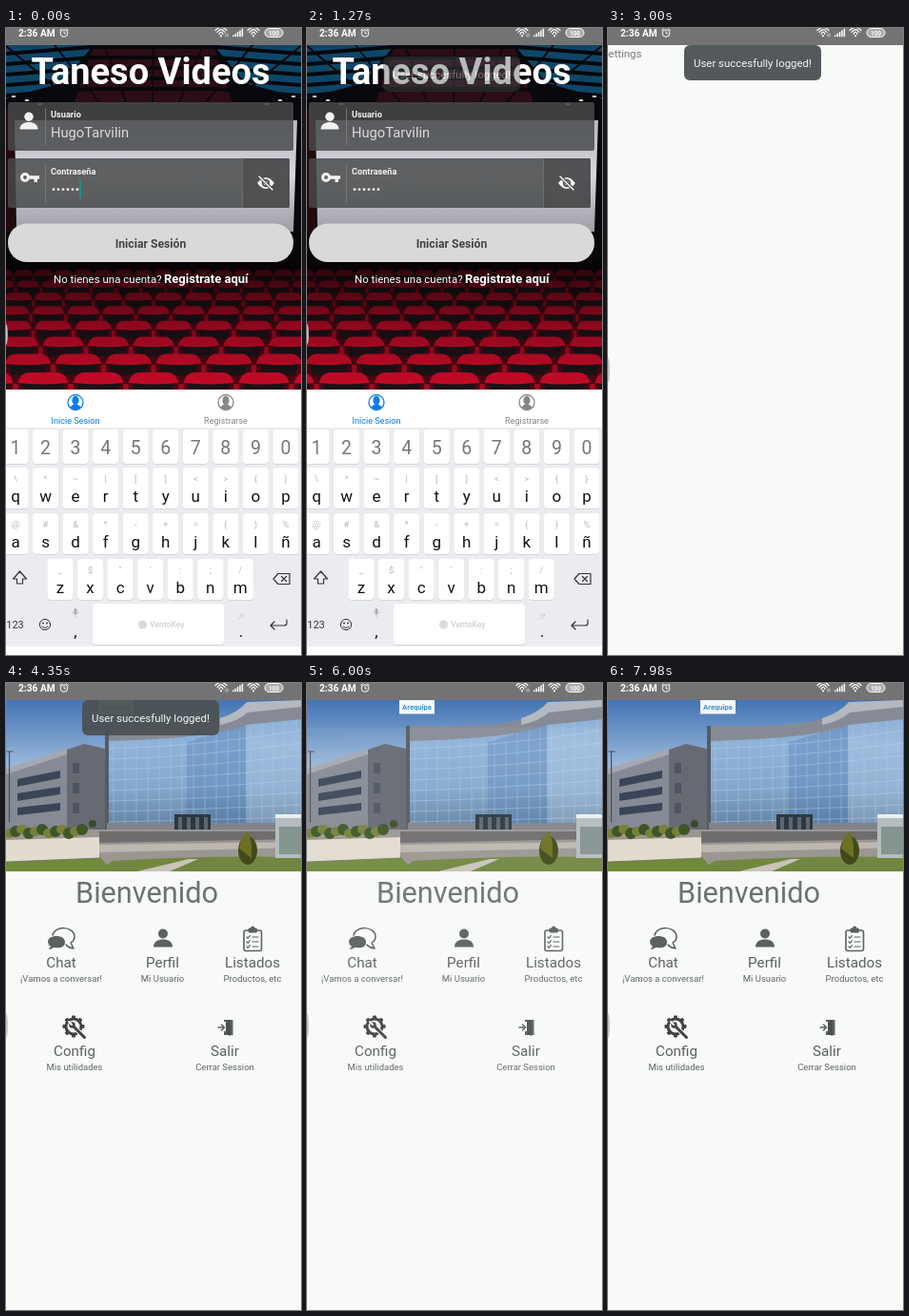
Recreate the animation shown at these times as an HTML page. Size 310 px wide and 659 px high, loop 8000 ms.

```html
<!DOCTYPE html>
<html lang="es">
<head>
<meta charset="utf-8">
<title>App</title>
<style>
html, body { margin: 0; width: 100%; height: 100%; overflow: hidden; background: #f7faf7; }
svg { display: block; width: 100%; height: 100%; }
text { font-family: Roboto, "Noto Sans", sans-serif; white-space: pre; }
</style>
</head>
<body>
<svg id="stage" viewBox="0 0 310 659"></svg>
<script>
const LOOP = 8000, PAGE = '#f7faf7';

const rect = (x, y, w, h, fill, r = 0, more = '') =>
  `<rect x="${x}" y="${y}" width="${w}" height="${h}" rx="${r}" fill="${fill}" ${more}/>`;
const path = (d, fill, more = '') => `<path d="${d}" fill="${fill}" ${more}/>`;
const line = (d, color, w = 1, more = '') =>
  path(d, 'none', `stroke="${color}" stroke-width="${w}" stroke-linecap="round" stroke-linejoin="round" ${more}`);
const disc = (x, y, r, fill, more = '') => `<circle cx="${x}" cy="${y}" r="${r}" fill="${fill}" ${more}/>`;
const oval = (x, y, rx, ry, fill) => `<ellipse cx="${x}" cy="${y}" rx="${rx}" ry="${ry}" fill="${fill}"/>`;
const text = (s, x, y, size, fill, anchor = 'middle', weight = 400) =>
  `<text x="${x}" y="${y}" font-size="${size}" fill="${fill}" text-anchor="${anchor}" font-weight="${weight}">${s}</text>`;
const group = (id, body, more = '') => `<g id="${id}" ${more}>${body}</g>`;
const repeat = (n, f) => Array.from({ length: n }, (_, i) => f(i)).join('');
const gradient = (id, ...stops) => `<linearGradient id="${id}" x2="0" y2="1">` +
  stops.map((c, i) => `<stop offset="${i / (stops.length - 1)}" stop-color="${c}"/>`).join('') + '</linearGradient>';

function wifi(x) {
  const arc = r => line(`M${x - r} ${8.5 - r} Q${x} ${4.5 - r * 1.4} ${x + r} ${8.5 - r}`, '#fff', 1.2);
  return arc(2) + arc(4) + arc(6) + disc(x, 8.3, 1.1, '#fff');
}

function statusBar() {
  return rect(0, 0, 310, 18, '#737373') +
    text('2:36 AM', 13, 9, 10.2, '#fff', 'start', 700) +
    disc(61, 5.5, 3.8, 'none', 'stroke="#fff"') + line('M61 3.5V5.8H62.8M56.5 2.5L58.5 .8M65.5 2.5L63.5 .8', '#fff', .9) +
    wifi(226) + line('M231 6v3m2-3v3', '#ddd', .8) +
    repeat(5, i => rect(238 + i * 2.4, 7.5 - i * 1.7, 1.5, 1.7 + i * 1.7, '#fff')) + wifi(260) +
    rect(272, .5, 19, 9, '#aaa', 4.5, 'stroke="#fff"') + text('100', 281.5, 7.6, 6.5, '#fff', 'middle', 700);
}

// A row of seats: red cushion tops above dark backs with red sides.
function seatRow(y, w, h, shift) {
  const half = Math.ceil(155 / w) + 1;
  return rect(0, y + h * .3, 310, h, '#4a0713') + repeat(half * 2 + 1, i => {
    const x = 155 + (i - half + shift) * w;
    return path(`M${x + w * .1} ${y + h * .4}H${x + w * .9}L${x + w * .82} ${y + h}H${x + w * .18}Z`, '#1c1216') +
      path(`M${x + w * .04} ${y + h * .46}Q${x + w * .1} ${y} ${x + w * .24} ${y}H${x + w * .76}Q${x + w * .9} ${y} ${x + w * .96} ${y + h * .46}Q${x + w / 2} ${y + h * .58} ${x + w * .04} ${y + h * .46}Z`, '#c80a28') +
      rect(x - w * .05, y + h * .5, w * .1, h * .42, '#a30a20', 1);
  });
}

function cinema() {
  const seats = repeat(8, i => {
    const u = i / 7;
    return seatRow(254 + 75 * u + 33 * u * u, 21 + 37 * u, 13 + 11 * u, i % 2 / 2);
  });
  return rect(0, 18, 310, 362, '#09080c') +
    path('M0 18H92L58 58L0 74Z', '#0e4668') + path('M310 18H218L252 58L310 74Z', '#0e4668') +
    path('M92 18H218L238 78H72Z', '#2c0d17') +
    repeat(5, i => line(`M0 ${27 + i * 11}L90 ${20 + i * 11}H220L310 ${27 + i * 11}`, '#07080c', 4)) +
    repeat(7, i => line(`M${i * 52 - 1} 18L${70 + i * 28} 78`, '#0d080c', 2)) +
    repeat(3, i => oval(8 + i * 14, 72 + i * 4, 2.5, 1, '#e8dccf') + oval(302 - i * 14, 72 + i * 4, 2.5, 1, '#e8dccf')) +
    path('M0 84L9 92V216H0Z', '#24090f') +
    path('M9 97H306L302 214H11Z', 'url(#screen)') +
    path('M0 214H310V256H0Z', '#0a0709') + seats +
    rect(0, 246, 310, 134, 'url(#shade)');
}

const person = (x, y, s, fill) =>
  `<g transform="translate(${x} ${y}) scale(${s})">` + disc(0, -5, 5, fill) +
  path('M-10 9C-10 3 -5 1 0 1S10 3 10 9Z', fill) + '</g>';

function tab(x, label, color) {
  return disc(x, 393.5, 8, '#fff', `stroke="${color}" stroke-width="1.3"`) +
    oval(x, 391.5, 3.6, 4.7, color) + path(`M${x - 6} 399Q${x - 4} 396 ${x - 1.8} 395.5H${x + 1.8}Q${x + 4} 396 ${x + 6} 399Q${x} 403.5 ${x - 6} 399Z`, color) +
    text(label, x, 416, 9.1, color);
}

function login() {
  const box = '#484a4c', glass = 'fill-opacity=".84"';
  return cinema() + text('Taneso Videos', 152, 59, 38, '#fff', 'middle', 700) +
    rect(2, 78, 300, 51, box, 2, glass) + rect(2, 137, 296, 52, box, 2, glass) +
    rect(248.5, 137, 49.5, 52, '#333', 0, 'fill-opacity=".3"') + line('M248.5 137V189', '#777', .7) +
    line('M41.5 85V123M41.5 143V183', '#777') +
    person(24, 98, .95, '#f2f2f2') +
    text('Usuario', 47, 94, 9.2, '#f4f4f4', 'start', 700) + text('HugoTarvilin', 47, 115, 14.7, '#dadada', 'start') +
    disc(20, 157, 3.5, 'none', 'stroke="#f2f2f2" stroke-width="3"') + path('M24 155.3H35V158.8H33V162H29.5V158.8H24Z', '#f2f2f2') +
    text('Contraseña', 47, 154, 9.2, '#f4f4f4', 'start', 700) +
    repeat(6, i => disc(50 + i * 5, 169.7, 1.4, '#eee')) +
    rect(77.3, 159.5, 1.5, 20, '#12a08d', 0, 'id="caret"') +
    path('M264 163Q273 151 282 163Q273 175 264 163Z', '#f2f2f2') + disc(273, 163, 4.2, '#505152') + disc(273, 163, 2.4, '#f2f2f2') +
    line('M265.5 155L281 171', '#505152', 3.6) + line('M266 156L280 170', '#f2f2f2', 1.5) +
    group('button', rect(2, 205.5, 300, 40.5, '#d8dad9', 20) + text('Iniciar Sesión', 152, 231, 12.2, '#444', 'middle', 700)) +
    text('No tienes una cuenta?', 50, 268, 11.5, '#fff', 'start') + text('Registrate aquí', 166, 268, 13, '#fff', 'start', 700) +
    oval(0, 322, 1.8, 11, '#c9c4c6') +
    rect(0, 380, 310, 40, '#fff') + tab(73, 'Inicie Sesion', '#0b7bea') + tab(231, 'Registrarse', '#868686');
}

function keyRow(letters, marks, x0, y, h) {
  return [...letters].map((c, i) => {
    const x = x0 + i * 31.55;
    const mark = { '<': '&lt;', '>': '&gt;', '&': '&amp;' }[marks[i]] || marks[i];
    return rect(x - 13.5, y + 1, 27, h, '#d3d6da', 4) + rect(x - 13.5, y, 27, h, '#fff', 4) +
      (marks ? text(mark, x, y + 15, 9.5, '#b4b6b9') + text(c, x, y + 36, 17, '#111')
             : text(c, x, y + 25.5, 19.5, '#74777a'));
  }).join('');
}

function keyboard() {
  const ink = '#333';
  return rect(0, 420, 310, 239, '#fff') + rect(0, 420, 310, 230, '#eaecef') +
    keyRow('1234567890', '', 10, 422, 36) +
    keyRow('qwertyuiop', '\\^~|[]<>{}', 10, 462, 43) +
    keyRow('asdfghjklñ', '@#&*-+=()%', 10, 510, 43) +
    keyRow('zxcvbnm', '_$"\':;/', 57, 558, 43) +
    line('M14.5 571L21.5 579H17.5V584H11.5V579H7.5Z', ink, 1.2) +
    line('M281 579L286 573.5H298V584.5H286ZM289.5 576.5L294.5 581.5M294.5 576.5L289.5 581.5', ink, 1.2) +
    text('123', 9.5, 631, 11, ink) +
    disc(41, 627, 5.6, 'none', `stroke="${ink}"`) + disc(39, 625.5, .9, ink) + disc(43, 625.5, .9, ink) + line('M38 629Q41 632 44 629', ink) +
    rect(71.5, 610, 3, 6, '#aaa', 1.5) + line('M70 614Q73 619 76 614M73 617V620', '#bbb', .8) + text(',', 73, 640, 17, '#111') +
    rect(91, 606, 138, 43, '#d3d6da', 4) + rect(91, 605, 138, 43, '#fff', 4) +
    disc(143.5, 627, 4.5, '#d8dadd') + text('VentoKey', 151, 630, 8.6, '#cfd1d4', 'start', 500) +
    text(',!?', 247, 621, 7, '#bbb') + text('.', 247, 640, 17, '#111') +
    line('M295 622V626Q295 628 292 628H278M282 624L278 628L282 632', ink, 1.2);
}

function campus() {
  const roof = 'M108 45Q190 47 222 39Q243 33 252 24L310 18';
  return rect(0, 18, 310, 180, 'url(#sky)') +
    path('M0 92L64 71V156H0Z', '#858a94') + path('M64 70L82 64L108 70V156H64Z', '#666a73') +
    path('M0 90L64 69V75L0 96Z', '#a3a8b1') +
    repeat(3, i => path(`M12 ${101 + i * 15}L57 ${92 + i * 17}V${100 + i * 17}L12 ${109 + i * 15}Z`, '#3a4658')) +
    repeat(3, i => rect(70, 84 + i * 21, 7, 11, '#4e545f')) +
    path(roof + 'V157H108Z', 'url(#glass)') + path('M190 62L252 44V157H190Z', '#3f6ea8', 'opacity=".28"') +
    path('M252 44L310 38V157H252Z', '#cfe0f0', 'opacity=".2"') +
    repeat(17, i => line(`M${113 + i * 12} ${i < 9 ? 58 : i < 12 ? 50 : 38}V148`, '#b4cbe2', .45)) +
    repeat(8, i => line(`M108 ${69 + i * 11}Q200 ${67 + i * 11} 310 ${50 + i * 13}`, '#bfd3e6', .45)) +
    path(roof + 'V38L252 44Q220 58 108 61Z', '#858a95') +
    path('M225 37Q244 31 253 20L310 18V25L254 31Q244 40 225 44Z', '#b4b8c0') +
    rect(104, 45, 4, 111, '#565b64') + rect(106, 147, 204, 9, '#80848a') +
    rect(177, 138, 38, 19, '#2f3840') + repeat(4, i => rect(181 + i * 9, 141, 4, 14, '#5a6872')) +
    path('M0 154H310V198H0Z', '#9b9692') + path('M98 156H310V164L98 168Z', '#706d6d') +
    path('M98 170L310 167V173L98 178Z', '#bdb7b0') +
    path('M112 187Q210 181 310 183V198H95Z', '#71873f') + path('M138 198L192 185L202 185L172 198Z', '#c9c3b8') +
    path('M0 186L98 182L112 198H0Z', '#6f8a3a') +
    path('M0 165L98 162V184L0 188Z', '#e2dbcf') + line('M0 188L98 184', '#77725f', .8) +
    repeat(12, i => oval(3 + i * 7, 158 - i % 3 * 2, 6, 5 + i % 2, i % 2 ? '#3f5527' : '#76813a')) +
    line('M3.5 72V146M1 72H7', '#4a4f55', 1.2) +
    rect(283, 139, 27, 45, '#b5bdc0') + rect(283, 138, 27, 4, '#eef0ef') + rect(287, 151, 23, 29, '#84948f') +
    disc(91, 148, 4, '#3b4b2a') + oval(254, 176, 10, 15, '#414a18') + path('M245 174Q247 160 254 156Q259 164 258 184Z', '#6d7024') +
    rect(97, 18, 37, 14.5, '#f3f8fc') + text('Arequipa', 115.5, 28, 7.6, '#3a93d0', 'middle', 700);
}

function home() {
  const ink = '#5c605e';
  const item = (name, sub, x, y) => text(name, x, y, 15.2, ink) + text(sub, x, y + 15, 9.5, '#626664');
  return rect(0, 18, 310, 641, PAGE) + campus() +
    text('Bienvenido', 148, 231, 30.7, '#6d716f') +
    item('Chat', '¡Vamos a conversar!', 58, 299) + item('Perfil', 'Mi Usuario', 164.5, 299) +
    item('Listados', 'Productos, etc', 259, 299) + item('Config', 'Mis utilidades', 72, 392) + item('Salir', 'Cerrar Session', 230, 392) +
    line('M49 265C51 255 71 255 72 266Q72 271 68 273L71 279Q65 278 63 275', ink, 1.5) +
    path('M44 272C44 264 62 264 62 272S53 278 50 278Q48 280 44.5 280L47 277Q44 275 44 272Z', ink) +
    person(165, 268.5, 1, ink) +
    rect(250, 260, 18.5, 21.5, 'none', 2, `stroke="${ink}" stroke-width="1.6"`) + rect(254.5, 257.5, 9.5, 5, ink, 1.5) + disc(259.2, 257.5, 2, ink) +
    repeat(3, i => line(`M253 ${267 + i * 5}l1.2 1.3l2.2 -2.6M259 ${267 + i * 5}H265`, ink, 1.2)) +
    disc(71, 361, 8, 'none', 'stroke="#414442" stroke-width="3"') +
    repeat(8, i => rect(69, 349.5, 4, 4, '#414442', 1, `transform="rotate(${i * 45} 71 361)"`)) +
    line('M71 361L82 372', PAGE, 5) + line('M70 360L82.5 372.5', '#414442', 3) + disc(69.5, 359.5, 3.2, '#414442') + line('M66 356L69 359', PAGE, 2) +
    path('M229 354H238.5V370H229V366H231V356H229Z', ink) + path('M231 356L236 354V371L231 369Z', '#4c504e') +
    line('M223 362H229M226.5 359L229.5 362L226.5 365', ink, 1.5);
}

const stage = document.getElementById('stage');
stage.innerHTML = '<defs>' + gradient('screen', '#b9bac2', '#d6d7dd', '#9c9da5') +
  gradient('shade', 'rgba(8,4,6,.85)', 'rgba(8,4,6,.3)', 'rgba(8,4,6,0)') +
  gradient('sky', '#4474b4', '#8fb0d6', '#dde6ee', '#dde6ee') + gradient('glass', '#6f98c8', '#8fb3d9', '#83a8cd', '#5d7c9c') + '</defs>' +
  group('login', login()) + group('keys', keyboard()) + group('home', home()) +
  group('settings', rect(0, 18, 310, 720, PAGE) + text('Settings', 35.5, 30.7, 11.5, '#777b79', 'end')) +
  group('handle', oval(0, 360, 2, 13, '#c6c9c7')) +
  group('toast', rect(80, 18, 144, 37, '#4b5254', 6, 'fill-opacity=".95"') + text('User succesfully logged!', 152, 41, 11.45, '#f4f4f4')) +
  disc(0, 0, 9.3, '#fff', 'id="touch" fill-opacity=".25" stroke="#bcc2ec" stroke-width="1.1"') + statusBar();

const part = {};
for (const node of stage.querySelectorAll('[id]')) part[node.id] = node;

const clamp = v => Math.max(0, Math.min(1, v));
const ramp = (t, a, b) => clamp((t - a) / (b - a));
const easeOut = v => 1 - (1 - v) ** 3;
const show = (node, opacity, x = 0, y = 0) => {
  node.style.display = opacity > .003 ? '' : 'none';
  node.setAttribute('opacity', opacity);
  node.setAttribute('transform', `translate(${x} ${y})`);
};

// Each visit to the settings page: tap, open, edge swipe, leave.
const visits = [
  { tap: 2430, open: [2680, 2990], swipe: 3850, leave: [4150, 4340], y: 488 },
  { tap: 4440, open: [4640, 4830], swipe: 5450, leave: [5800, 6120], y: 516 },
  { tap: 6430, open: [6470, 6650], swipe: 7390, leave: [7700, 7960], y: 523, ghost: .2 }
];

function touchAt(t) {
  if (t < 500) return [160, 228, ramp(t, 60, 110) * (1 - ramp(t, 300, 440))];
  for (const v of visits) {
    if (t >= v.tap && t < v.swipe) {
      const fade = 1 - ramp(t, ...v.open);
      return [77, 381.5, Math.max(ramp(t, v.tap, v.tap + 40) * fade, t > v.open[0] ? v.ghost || 0 : 0)];
    }
    if (t >= v.swipe && t < v.leave[1]) {
      const p = easeOut(ramp(t, v.swipe, v.leave[0]));
      return [130 * p, v.y + 42 * p * p, 1 - ramp(t, v.leave[0] - 30, v.leave[0] + 90)];
    }
  }
  return [0, 0, 0];
}

function draw(t) {
  const enter = easeOut(ramp(t, 1380, 1640));
  show(part.login, enter < 1 ? 1 : 0);
  show(part.keys, enter < 1 ? 1 : 0, 0, 239 * ramp(t, 1340, 1580) ** 2);
  part.button.setAttribute('opacity', 1 - .55 * ramp(t, 70, 160) * (1 - ramp(t, 320, 560)));
  part.caret.style.display = t < 500 ? '' : 'none';
  show(part.home, enter, 0, 40 * (1 - enter));
  show(part.handle, enter);

  let page = 0;
  for (const v of visits) page += easeOut(ramp(t, ...v.open)) - easeOut(ramp(t, ...v.leave));
  show(part.settings, page, 0, 30 * (1 - page));

  const toast = ramp(t, 1200, 1370);
  show(part.toast, toast * (1 - ramp(t, 4420, 4640)), 0, 20 * (1 - toast));
  const [x, y, alpha] = touchAt(t);
  show(part.touch, alpha, x, y);
}

const start = performance.now();
function tick() {
  draw((performance.now() - start) % LOOP);
  requestAnimationFrame(tick);
}
draw(0);
requestAnimationFrame(tick);
</script>
</body>
</html>
```
